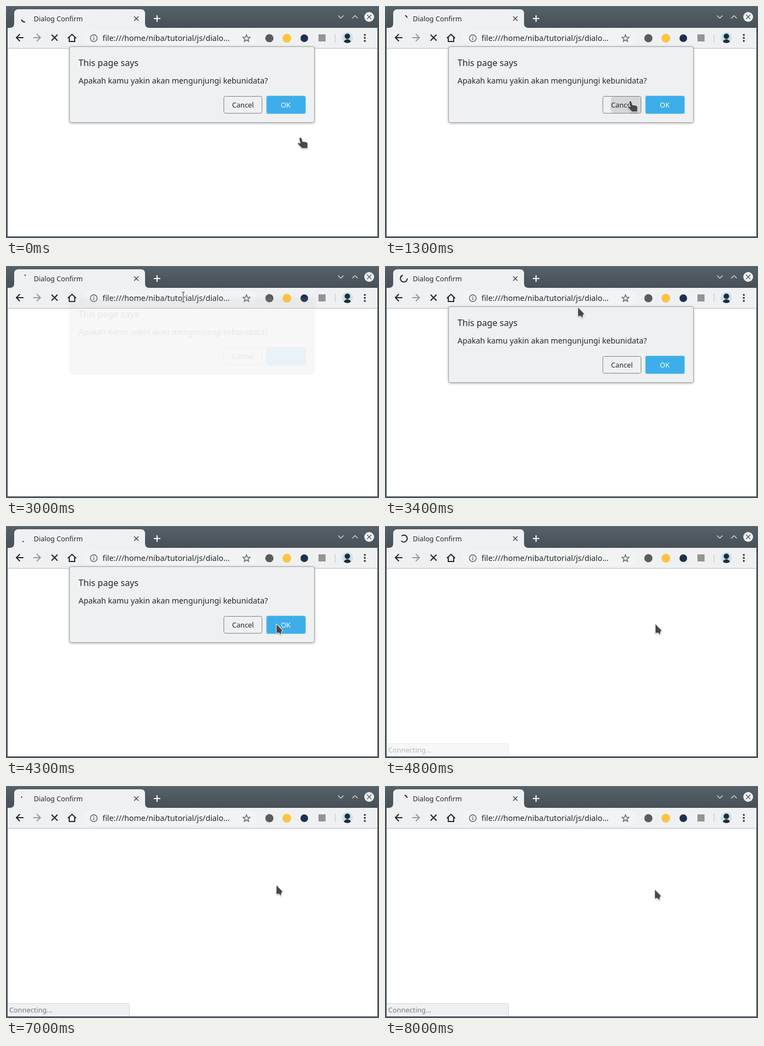
An HTML page with a canvas for the animation above (8.1 s loop, 684 by 425 pixels).

```html
<!DOCTYPE html>
<html lang="id">
<head>
<meta charset="utf-8">
<title>Dialog Confirm</title>
<style>
html, body { margin: 0; width: 100%; height: 100%; overflow: hidden; background: #4b565d; }
canvas { display: block; width: 684px; height: 425px; }
</style>
</head>
<body>
<canvas id="stage" width="684" height="425"></canvas>
<script>
const ctx = document.getElementById('stage').getContext('2d');
const LOOP = 8100, STEP = 100;
const PAUSES = [4200, 5100, 5700, 5800, 6000, 7300];
const SANS = '"Noto Sans", sans-serif', SERIF = '"Liberation Serif", serif';
const INK = '#232629', PANEL = '#eff0f1', BLUE = '#3daee9', GREY = '#5c6063';
const URL_HEAD = 'file:///home/niba/tutorial/js/dialo';

// Key lists: [time, value, value]
const POINTER = [
  [0, 535, 241], [200, 533, 242], [500, 492, 218], [900, 445, 174], [1600, 445, 174],
  [1601, 450, 175], [1900, 353, 93], [2100, 325, 57],
  [3300, 325, 57], [3800, 470, 150], [4100, 496, 180], [5600, 496, 180], [5900, 496, 181],
  [6900, 496, 182], [7300, 496, 182], [7700, 496, 191], [8000, 495, 190]
];
const DIALOG = [
  [1300, 1, 0], [1500, 0, -16], [2980, 0, -17], [3250, 1, 0], [4500, 1, 0], [4700, 0, -16]
];

const ARROW = new Path2D('M0 0V16L4.6 15.2L8 19L8.9 13.8L11 11.3Z');
const HAND = new Path2D('M3 1.8Q4.6-1 6.8 1.6L8.6 7.4L15.6 8.6Q18 9.2 18 12L17.5 19.6H8L1 12.2Q-.2 10 2 9.4L5 11.4Z');
const IBEAM = new Path2D('M-3-9H-1L0-8L1-9H3M0-8V8M-3 9H-1L0 8L1 9H3');

function sample(keys, t) {
  if (t <= keys[0][0]) return keys[0].slice(1);
  const i = keys.findIndex(k => k[0] >= t);
  if (i < 0) return keys[keys.length - 1].slice(1);
  const a = keys[i - 1], b = keys[i], p = (t - a[0]) / (b[0] - a[0]);
  return [1, 2].map(n => a[n] + (b[n] - a[n]) * p);
}

function rect(x, y, w, h, color) {
  ctx.fillStyle = color;
  ctx.fillRect(x, y, w, h);
}

function round(x, y, w, h, r, fill, line, width = 1) {
  ctx.beginPath();
  ctx.roundRect(x, y, w, h, r);
  if (fill) { ctx.fillStyle = fill; ctx.fill(); }
  if (line) { ctx.strokeStyle = line; ctx.lineWidth = width; ctx.stroke(); }
}

function disc(x, y, r, color) {
  ctx.beginPath();
  ctx.arc(x, y, r, 0, 7);
  ctx.fillStyle = color;
  ctx.fill();
}

function text(str, x, y, size, color = INK, family = SANS) {
  ctx.font = size + 'px ' + family;
  ctx.fillStyle = color;
  ctx.fillText(str, x, y);
}

function icon(x, y, d, color, width = 2) {
  ctx.save();
  ctx.translate(x, y);
  ctx.strokeStyle = color;
  ctx.lineWidth = width;
  ctx.stroke(new Path2D(d));
  ctx.restore();
}

function cross(x, y, r, color, width) {
  icon(x, y, `M${-r} ${-r}L${r} ${r}M${r} ${-r}L${-r} ${r}`, color, width);
}

// cubic-bezier(.4, 0, .2, 1)
function fastOutSlowIn(x) {
  let lo = 0, hi = 1;
  for (let i = 0; i < 20; i++) {
    const s = (lo + hi) / 2, q = 1 - s;
    if (1.2 * q * q * s + 0.6 * q * s * s + s ** 3 < x) lo = s; else hi = s;
  }
  return 3 * (1 - lo) * lo * lo + lo ** 3;
}

function spinner(elapsed) {
  const half = 2000 / 3, turn = Math.floor(elapsed / (2 * half));
  const phase = elapsed / half - 2 * turn;
  const base = 270 + 360 * elapsed / 1568 + 270 * turn;
  let from = base, to = base + 270;
  if (phase < 1) to = base + Math.max(5, 270 * fastOutSlowIn(phase));
  else from = Math.min(to - 5, base + 270 * fastOutSlowIn(phase - 1));
  const rad = Math.PI / 180;
  ctx.beginPath();
  ctx.arc(34.5, 23, 6.3, (from % 360) * rad, (from % 360 + to - from) * rad);
  ctx.strokeStyle = INK;
  ctx.lineWidth = 2;
  ctx.lineCap = 'round';
  ctx.stroke();
  ctx.lineCap = 'butt';
}

function drawFrame() {
  rect(0, 0, 684, 425, '#4b565d');
  const g = ctx.createLinearGradient(0, 0, 0, 40);
  g.addColorStop(0, '#566169');
  g.addColorStop(1, '#475057');
  rect(0, 0, 684, 40, g);
  rect(0, 0, 684, 1, '#66717a');
  rect(3, 40, 678, 37, PANEL);
  rect(3, 77, 678, 1, '#b8babc');
  rect(3, 78, 678, 344, '#fff');

  ctx.fillStyle = PANEL;
  ctx.fill(new Path2D('M7 40Q15 40 15 32V14Q15 6 23 6H247Q255 6 255 14V32Q255 40 263 40Z'));
  text('Dialog Confirm', 51, 28, 12.7);
  cross(239, 23, 4, '#4a4e51', 1.6);
  icon(277, 23, 'M-6 0H6M0-6V6', '#fff');
  icon(614, 20, 'M-5-2.5L0 2.5L5-2.5', '#e6e8e9', 1.2);
  icon(640, 20, 'M-5 2.5L0-2.5L5 2.5', '#e6e8e9', 1.2);
  disc(666, 20, 9, PANEL);
  cross(666, 20, 4, '#475057', 1.2);
}

function drawToolbar(loading, focused, selected) {
  icon(25, 58, 'M7 0H-6M.5-6.5L-6 0L.5 6.5', INK);
  icon(57, 58, 'M-7 0H6M-.5-6.5L6 0L-.5 6.5', '#98999b');
  if (loading) cross(89, 58, 5.5, INK, 2);
  else {
    icon(89, 58, 'M4.7-3.8A6 6 0 1 0 5.8 1.6', INK);
    ctx.fillStyle = INK;
    ctx.fill(new Path2D('M96 51V57.5H89.5Z'));
  }
  icon(121, 58, 'M-7.5 1L0-6.2L7.5 1M-5-1V7H5V-1', INK);

  if (focused) round(143, 45, 317, 27, 13.5, '#fff', BLUE, 2);
  else round(142, 45, 318, 27, 13.5, '#f1f3f4');
  icon(161, 59, 'M-6.2 0A6.2 6.2 0 1 0 6.2 0A6.2 6.2 0 1 0-6.2 0M0-.8V3.5M0-3.4V-1.8', GREY, 1.4);
  if (selected) {
    rect(177, 47, 241, 23, BLUE);
    ctx.save();
    ctx.beginPath();
    ctx.rect(177, 47, 241, 23);
    ctx.clip();
    text(URL_HEAD + 'g-confirm', 177, 64, 14.27, '#fff');
    ctx.restore();
  } else text(URL_HEAD + '...', 177, 64, 14.27);

  let star = '';
  for (let i = 0; i < 10; i++) {
    const a = -Math.PI / 2 + i * Math.PI / 5, r = i % 2 ? 2.9 : 6.8;
    star += (i ? 'L' : 'M') + r * Math.cos(a) + ' ' + r * Math.sin(a);
  }
  icon(441, 59.5, star + 'Z', GREY, 1.4);

  disc(483, 59, 7.5, '#5a5c5e');
  disc(515, 59, 8, '#fcc440');
  disc(547, 59, 7, '#1f2f50');
  rect(573, 52, 13, 13, '#929394');
  rect(603, 51, 1, 16, '#c3c5c7');

  ctx.save();
  ctx.beginPath();
  ctx.arc(626, 58, 10, 0, 7);
  ctx.clip();
  rect(615, 47, 22, 22, '#c3e4f1');
  disc(626, 55.5, 5, '#262b31');
  disc(626, 68, 7, '#262b31');
  ctx.restore();
  for (const y of [53, 58.5, 64]) disc(658, y, 1.7, INK);
}

function ripple(x, y, w, h, cx, r) {
  if (r <= 0) return;
  ctx.save();
  ctx.beginPath();
  ctx.roundRect(x, y, w, h, 3);
  ctx.clip();
  disc(cx, 181, r, 'rgba(0,0,0,.11)');
  ctx.restore();
}

function drawDialog(t) {
  const [alpha, dy] = sample(DIALOG, t);
  if (alpha <= 0) return;
  ctx.save();
  ctx.globalAlpha = alpha;
  ctx.translate(0, dy);
  ctx.shadowColor = 'rgba(0,0,0,.4)';
  ctx.shadowBlur = 4;
  ctx.shadowOffsetY = 1;
  round(116.5, 74.5, 449, 139, 3, PANEL);
  ctx.shadowColor = 'transparent';
  round(116.5, 74.5, 449, 139, 3, null, '#a2a4a6');
  text('This page says', 133, 110, 16.15);
  text('Apakah kamu yakin akan mengunjungi kebunidata?', 133, 142, 14.29);

  round(399.5, 165.5, 70, 31, 3, PANEL, '#7d8082');
  text('Cancel', 414.5, 186, 12.8);
  round(477.5, 164.5, 72, 33, 3, BLUE, '#9fd3ee');
  text('OK', 504, 186, 12.8, '#fff');
  if (t < 2000) ripple(400, 166, 69, 30, 450, (t - 1100) * 0.185);
  else ripple(478, 165, 71, 32, 497, (t - 4300) * 0.2);
  ctx.restore();
}

function drawPointer(t) {
  const [x, y] = sample(POINTER, t).map(Math.round);
  ctx.save();
  ctx.translate(x, y);
  ctx.lineJoin = 'round';
  if (t > 1600 && y < 73) {
    ctx.strokeStyle = '#fff';
    ctx.lineWidth = 3;
    ctx.stroke(IBEAM);
    ctx.strokeStyle = '#46494c';
    ctx.lineWidth = 1.2;
    ctx.stroke(IBEAM);
  } else {
    const shape = t <= 1600 ? HAND : ARROW;
    ctx.shadowColor = 'rgba(0,0,0,.3)';
    ctx.shadowBlur = 2;
    ctx.shadowOffsetY = 1;
    ctx.strokeStyle = '#fff';
    ctx.lineWidth = 2;
    ctx.stroke(shape);
    ctx.shadowColor = 'transparent';
    ctx.fillStyle = '#46494c';
    ctx.fill(shape);
  }
  ctx.restore();
}

function drawStatus(alpha) {
  ctx.save();
  ctx.globalAlpha = alpha;
  round(2.5, 398.5, 224, 24, [0, 3, 0, 0], PANEL, '#d3d5d6');
  text('Connecting...', 6, 415, 12.8, '#77797b');
  ctx.restore();
  rect(0, 422, 684, 3, '#4b565d');
  rect(0, 398, 3, 27, '#4b565d');
}

function render(t) {
  const loading = t < 1500 || t >= 3000;
  drawFrame();
  drawToolbar(loading, t >= 2300 && t < 3000, t >= 2300 && t < 2800);
  if (loading) spinner(t < 1500 ? t + 5500 : t - 2985);
  else {
    icon(35, 23, 'M-5-6.5H1.5L5-3V6.5H-5ZM1.5-6.5V-3H5', GREY, 1.1);
    text('Baiklah, tetap di sini saja ya :)', 11, 100, 16, '#000', SERIF);
  }
  drawDialog(t);
  if (t >= 4800) drawStatus(t < 4900 ? 0.5 : 1);
  drawPointer(t);
}

function tick() {
  let t = Math.floor((performance.now() - start) % LOOP / STEP) * STEP;
  while (PAUSES.includes(t)) t -= STEP;
  render(t);
  requestAnimationFrame(tick);
}

const start = performance.now();
tick();
</script>
</body>
</html>
```
